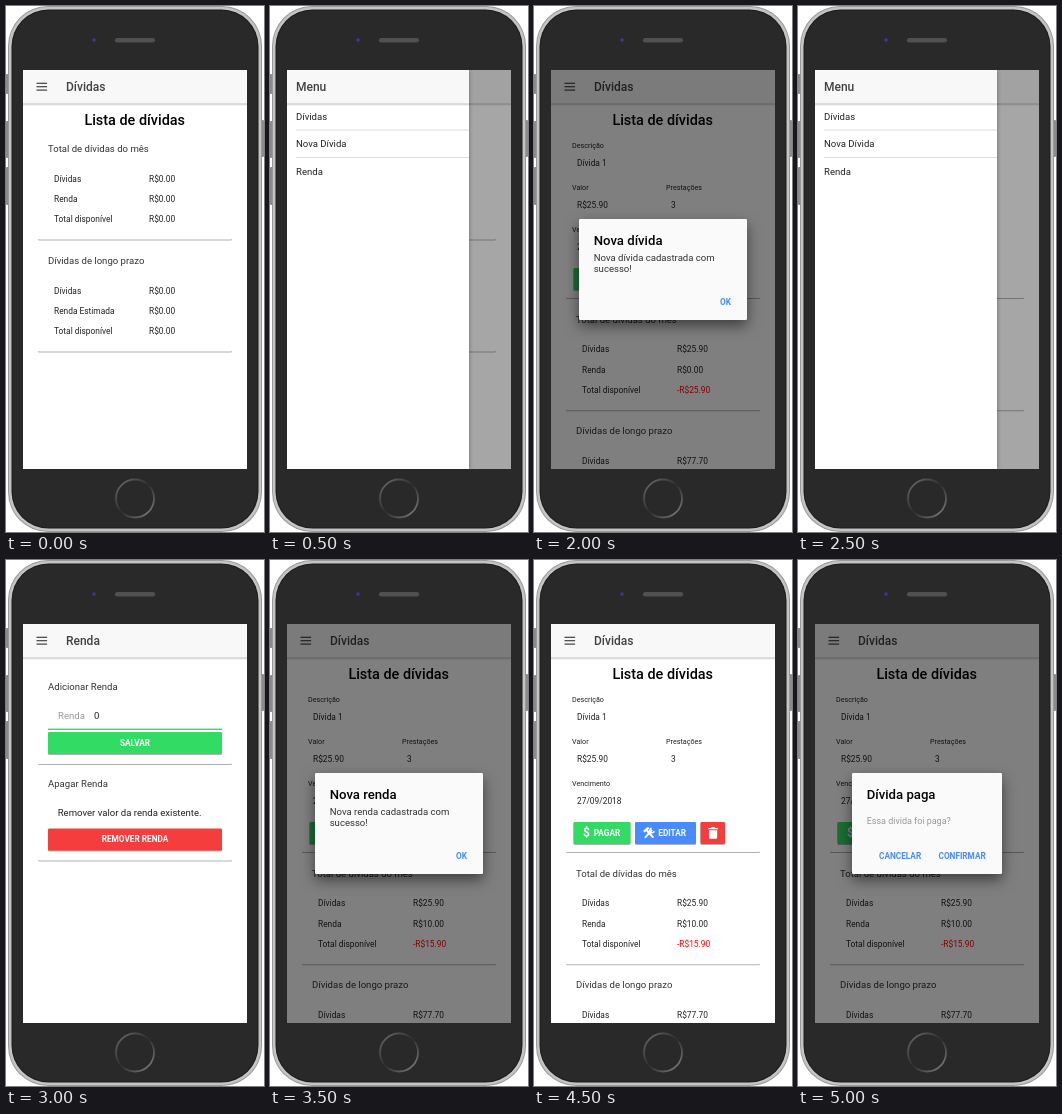
Recreate the animation shown at these times as an HTML page. Size 258 px wide and 526 px high, loop 5500 ms.

```html
<!DOCTYPE html>
<html lang="pt-BR">
<head>
<meta charset="utf-8">
<title>Lista de dívidas</title>
<style>
  html, body { margin: 0; width: 100%; height: 100%; overflow: hidden; background: #fff; }
  svg { display: block; }
  text { font-family: Roboto, "Noto Sans", sans-serif; white-space: pre; }
  .medium { font-weight: 500; }
  .bold { font-weight: 700; }
  .mid { text-anchor: middle; }
  .card { filter: drop-shadow(0 1.1px .6px rgba(0, 0, 0, .3)); }
  .dialog { filter: drop-shadow(0 6px 7px rgba(0, 0, 0, .5)); }
  .panel { filter: drop-shadow(0 0 2px rgba(0, 0, 0, .35)); }
  /* eleven screens side by side, one shown every 500 ms */
  #strip { animation: roll 5500ms steps(11, end) infinite; }
  @keyframes roll { to { transform: translateX(-2464px); } }
</style>
</head>
<body>
<svg width="258" height="526" viewBox="0 0 258 526">
  <defs>
    <linearGradient id="ring" x1="0" y1="0" x2="1" y2="1">
      <stop offset="0" stop-color="#6e6e6e"/>
      <stop offset=".5" stop-color="#2c2c2c"/>
      <stop offset="1" stop-color="#858585"/>
    </linearGradient>
    <linearGradient id="edge" x1="0" x2="0" y1="0" y2="1">
      <stop offset="0" stop-color="#000" stop-opacity=".24"/>
      <stop offset="1" stop-color="#000" stop-opacity="0"/>
    </linearGradient>
  </defs>
  <g fill="#8b8b8b">
    <rect x="0" y="68" width="5" height="20" rx="1"/>
    <rect x="0" y="115" width="5" height="37" rx="1"/>
    <rect x="0" y="161" width="5" height="38" rx="1"/>
    <rect x="253" y="114" width="5" height="37" rx="1"/>
  </g>
  <rect x="2" y="0" width="254" height="526" rx="40" fill="#9a9a9a"/>
  <rect x="3" y="1" width="252" height="524" rx="39" fill="#c4c4c4"/>
  <rect x="5.5" y="3.5" width="247" height="519" rx="37" fill="#1c1c1c"/>
  <rect x="6.5" y="4.5" width="245" height="517" rx="36" fill="#292929"/>
  <circle cx="88" cy="34" r="2.5" fill="#2b2b52"/>
  <circle cx="88" cy="34" r="1.5" fill="#3d3d80"/>
  <rect x="109" y="32" width="40" height="4.5" rx="2.2" fill="#515151"/>
  <circle cx="129" cy="492.5" r="19" fill="#292929" stroke="url(#ring)" stroke-width="1.8"/>
  <svg x="17" y="64" width="224" height="399" viewBox="17 64 224 399">
    <g id="strip"></g>
  </svg>
</svg>
<script>
const GREEN = '#32db64', BLUE = '#488aff', RED = '#f53d3d', GRAY = '#999', INK = '#222';
const BODY = 9.57, SMALL = 8.37, CAPS = 8.25;

const rect = (x, y, w, h, fill, extra = '') =>
  `<rect x="${x}" y="${y}" width="${w}" height="${h}" fill="${fill}" ${extra}/>`;
const text = (x, y, str, size = BODY, fill = INK, cls = '') =>
  `<text x="${x}" y="${y}" font-size="${size}" fill="${fill}" class="${cls}">${str}</text>`;
const small = (x, y, str, fill) => text(x, y, str, SMALL, fill);
const card = (y, h) => rect(32, y, 194, h, '#fff', 'rx="1.2" class="card"');
const button = (x, y, w, fill) => rect(x, y, w, 22, fill, 'rx="1.2" class="card"');
const wideButton = (x, y, w, fill, str) =>
  button(x, y, w, fill) + text(129, y + 13.5, str, CAPS, '#fff', 'bold mid');
const dim = alpha => rect(17, 64, 224, 399, '#000', `opacity="${alpha}"`);

const bar = (w, x, title) =>
  rect(17, 64, w, 33.5, '#f8f8f8') + rect(17, 97.5, w, 2.5, 'url(#edge)') +
  text(x, 84.7, title, 12, '#424242', 'medium');

const page = (title, content) =>
  rect(17, 64, 224, 399, '#fff') + content + bar(224, 60, title) +
  [77, 80.4, 83.8].map(y => rect(30.5, y - .3, 10.6, 1.2, '#424242')).join('');

// Summary card: rows are [label, value, colour]
const summary = (y, title, rows) =>
  card(y, 106.5) + text(42, y + 19, title, BODY, '#333') +
  rows.map(([label, value, fill], i) =>
    small(48, y + 48.5 + i * 20.3, label) + small(143, y + 48.5 + i * 20.3, value, fill)).join('');

const month = (y, debt, income, left, fill) =>
  summary(y, 'Total de dívidas do mês',
    [['Dívidas', debt], ['Renda', income], ['Total disponível', left, fill]]);
const longTerm = (y, debt, left) =>
  summary(y, 'Dívidas de longo prazo',
    [['Dívidas', debt], ['Renda Estimada', 'R$0.00'], ['Total disponível', left]]);

const heading = text(128.7, 118.5, 'Lista de dívidas', 14.4, '#000', 'medium mid');

const tools = `<g stroke="#fff" stroke-linecap="round" fill="none">
  <path d="M111.5 277.2 L117.5 270.4" stroke-width="2"/>
  <path d="M112.5 270 L118.8 277" stroke-width="2"/>
  <path d="M110.6 271.2 L114 268.2" stroke-width="2.4"/>
  <path d="M117 268.4 A2.3 2.3 0 1 0 120 271.6" stroke-width="1.6"/></g>`;
const trash = `<path fill="#fff" d="M174.4 268h2.7l.8-1h2.4l.8 1h2.7v1.3h-9.4z
  M175 270.2h8.2v7.4q0 1.2-1.2 1.2h-5.8q-1.2 0-1.2-1.2z"/>`;

const field = (x, y, label, value) => text(x, y, label, 7.18) + small(x + 5, y + 17.3, value);

const debtCard = card(127.5, 164.5) +
  field(38, 142.4, 'Descrição', 'Dívida 1') +
  field(38, 184.4, 'Valor', 'R$25.90') +
  field(132, 184.4, 'Prestações', '3') +
  field(38, 226.4, 'Vencimento', '27/09/2018') +
  button(39.5, 262, 57, GREEN) + text(52.5, 277, '$', 12, '#fff', 'bold mid') +
  text(59.7, 275.7, 'PAGAR', CAPS, '#fff', 'bold') +
  button(101, 262, 61, BLUE) + tools + text(124.3, 275.7, 'EDITAR', CAPS, '#fff', 'bold') +
  button(166.5, 262, 24.5, RED) + trash;

const emptyList = page('Dívidas',
  heading + month(127, 'R$0.00', 'R$0.00', 'R$0.00') + longTerm(239, 'R$0.00', 'R$0.00'));

const list = (income, left) => page('Dívidas',
  heading + debtCard + month(297.7, 'R$25.90', income, left, '#f00') +
  longTerm(409.2, 'R$77.70', '-R$77.70'));

const menu = under => under + dim(.35) +
  rect(17, 64, 182, 399, '#fff', 'class="panel"') + bar(182, 26, 'Menu') +
  ['Dívidas', 'Nova Dívida', 'Renda'].map((s, i) => text(26, 113.8 + i * 27.6, s)).join('') +
  rect(26, 123.5, 173, 1, '#dedede') + rect(26, 151, 173, 1, '#dedede');

const form = filled => {
  const line = y => rect(36, y, 186, 1.4, filled ? GREEN : '#dedede');
  const rows = [['Descrição', 'Dívida 1'], ['Valor', '25,90'], ['Prestações', '3']];
  return page('Nova Dívida', rows.map(([label, value], i) => {
    const y = 131.3 + i * 40.7;
    return (filled
      ? text(36, y, label, 7.65, GRAY) + text(36, y + 18.3, value)
      : text(36, y + 18.3, label, BODY, GRAY)) + line(y + 24.7);
  }).join('') +
    text(36, 257.3, 'Vencimento', BODY, GRAY) +
    (filled ? text(97, 257.3, '27/09/2018', 10) : '') + line(267.9) +
    wideButton(36, 271.8, 186, GREEN, 'CADASTRAR'));
};

const income = page('Renda',
  card(113, 91) + text(42, 130, 'Adicionar Renda', BODY, '#333') +
  text(52, 159.3, 'Renda', BODY, GRAY) + text(88, 159.3, '0') +
  rect(42, 168.6, 174, 1.4, GREEN) + wideButton(42, 172, 174, GREEN, 'SALVAR') +
  card(210.5, 90) + text(42, 227.3, 'Apagar Renda', BODY, '#333') +
  text(51.7, 256.2, 'Remover valor da renda existente.') +
  wideButton(42, 268.5, 174, RED, 'REMOVER RENDA'));

const alertBox = (under, x, w, title, body, actions) => under + dim(.5) +
  rect(x, 213, w, 101, '#fafafa', 'rx="1.2" class="dialog"') +
  text(x + 14.7, 239.3, title, 13.15, '#000', 'medium') + body +
  actions.map(([ax, s]) => text(ax, 299.3, s, CAPS, BLUE, 'bold')).join('');

const saved = (under, title, lines) => alertBox(under, 45, 168, title,
  lines.map((s, i) => text(59.7, 255 + i * 11.3, s, BODY, '#333')).join(''), [[186, 'OK']]);

const unpaid = list('R$0.00', '-R$25.90');
const updated = list('R$10.00', '-R$15.90');

const screens = [
  emptyList,
  menu(emptyList),
  form(false),
  form(true),
  saved(unpaid, 'Nova dívida', ['Nova dívida cadastrada com', 'sucesso!']),
  menu(unpaid),
  income,
  saved(updated, 'Nova renda', ['Nova renda cadastrada com', 'sucesso!']),
  updated,
  updated,
  alertBox(updated, 54, 150, 'Dívida paga',
    text(68.7, 263.5, 'Essa divida foi paga?', 8.97, GRAY),
    [[81, 'CANCELAR'], [140.5, 'CONFIRMAR']])
];

// Each screen clips its own overflow so neighbours stay clean
document.getElementById('strip').innerHTML = screens.map((s, i) =>
  `<svg x="${17 + i * 224}" y="64" width="224" height="399" viewBox="17 64 224 399">${s}</svg>`).join('');
</script>
</body>
</html>
```
